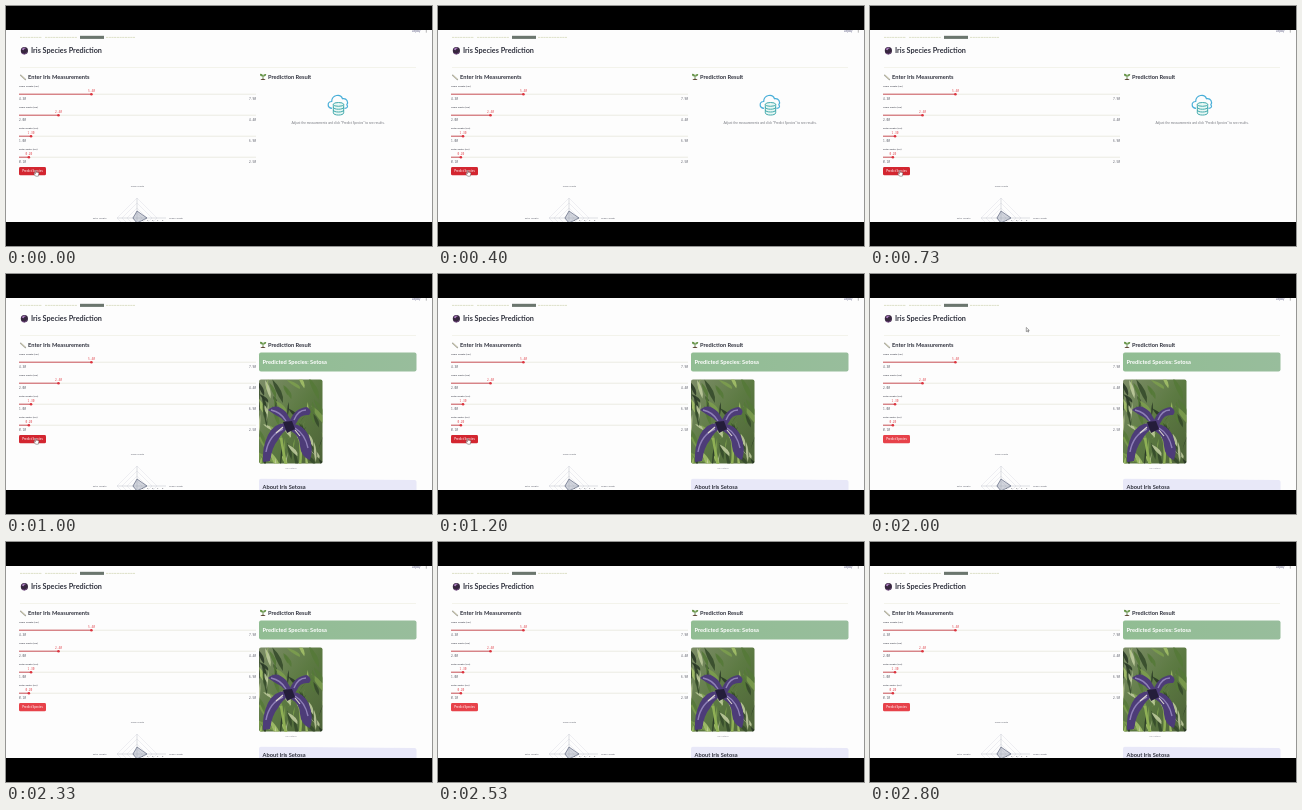
These frames come from a looping animation (426 by 240 pixels, 2.87 s). An HTML page:

```html
<!DOCTYPE html>
<html lang="en">
<head>
<meta charset="utf-8">
<title>Iris Species Prediction</title>
<style>
  html, body { margin: 0; width: 100%; height: 100%; overflow: hidden; background: #000; }
  svg { display: block; width: 100vw; height: 100vh; }
  text { font-family: Lato, "Open Sans", sans-serif; fill: #31333f; }
  .title { font-size: 7.25px; font-weight: 700; }
  .head { font-size: 5.7px; font-weight: 700; }
  .label { font-size: 2.65px; }
  .axis { font-size: 2.5px; fill: #666873; text-anchor: middle; }
  .mono { font-family: "Noto Sans Mono", "DejaVu Sans Mono", monospace; font-size: 2.9px; fill: #555763; }
  .value { fill: #e0454d; }
  .mid { text-anchor: middle; }
  .end { text-anchor: end; }
</style>
</head>
<body>
<svg viewBox="0 0 426 240">
  <defs>
    <clipPath id="page"><rect y="24" width="426" height="192"/></clipPath>
    <clipPath id="frame"><rect x="253" y="105.5" width="63.5" height="84" rx="2"/></clipPath>
    <linearGradient id="banner">
      <stop offset="0" stop-color="#91bd93"/><stop offset="1" stop-color="#98bd9c"/>
    </linearGradient>
    <linearGradient id="foliage" x2="1" y2="1">
      <stop offset="0" stop-color="#7d8d68"/><stop offset=".5" stop-color="#5c7a42"/><stop offset="1" stop-color="#4d6238"/>
    </linearGradient>
  </defs>
  <rect width="426" height="240"/>
  <g clip-path="url(#page)">
    <rect y="24" width="426" height="192" fill="#fdfdfd"/>

    <g id="tabs"></g>
    <text x="406" y="26.1" font-size="2.7" style="fill:#5d5d84">Deploy</text>
    <path d="M420.3 24v2.4" stroke="#666" stroke-width=".8" stroke-dasharray=".6 .4"/>
    <path d="M14 61.5H410" stroke="#ededdf" stroke-width=".6"/>

    <circle cx="18.4" cy="44.7" r="3.6" fill="#37263f"/>
    <path d="M15.6 43.5q2-3 4.3-1.3q-1.8.1-2.2 2z" fill="#a77bbb"/>
    <path d="M16 47.5q3 1.8 5-.8" fill="none" stroke="#784c88" stroke-width=".9"/>
    <text class="title" x="25" y="47.2">Iris Species Prediction</text>

    <path d="M14.7 69.2l4.7 4.3" stroke="#a6a69c" stroke-width="1.5" stroke-linecap="round"/>
    <path d="M15 69.2l4.1 3.8" stroke="#e6dfb5" stroke-width=".5"/>
    <text class="head" x="22" y="73.2">Enter Iris Measurements</text>

    <path d="M257 73v-3.4" stroke="#55833d" stroke-width=".8"/>
    <path d="M257 70.4q-3.3.3-3-2.5q3.2-.3 3 2.5q0-2.8 3.2-2.4q.1 2.8-3.2 2.4" fill="#69964b"/>
    <path d="M254.3 74q2.7-2.6 5.4 0z" fill="#61493a"/>
    <text class="head" x="262" y="73.2">Prediction Result</text>

    <g id="sliders"></g>

    <rect id="button" x="13" y="161" width="27" height="8.3" rx="1.4"/>
    <text class="mid" x="26.5" y="166.1" font-size="3.1" style="fill:#fff">Predict Species</text>

    <g id="radar"></g>

    <g id="waiting">
      <path d="M326 102.3c-5-.4-5.1-6.5-.3-6.8c.2-7 9-8 10.8-2.8c4.4-.8 6.2 3.6 4.3 6.2c1.7 1.6.3 3.5-2.3 3.4"
            fill="none" stroke="#48aed8" stroke-width="1.2"/>
      <g fill="#e8f8f4" stroke="#43aaad" stroke-width="1">
        <path d="M327.3 98.4v8.4c0 3 10.4 3 10.4 0v-8.4z"/>
        <ellipse cx="332.5" cy="98.4" rx="5.2" ry="1.9"/>
        <path d="M327.3 101.2c0 2.7 10.4 2.7 10.4 0M327.3 104c0 2.7 10.4 2.7 10.4 0" fill="none"/>
      </g>
      <text class="mid" x="332" y="118.4" font-size="3.2" style="fill:#777980">Adjust the measurements and click "Predict Species" to see results.</text>
    </g>

    <g id="result">
      <rect x="253" y="78.5" width="157.5" height="19" rx="2" fill="url(#banner)"/>
      <text class="head" x="256.5" y="89.6" style="fill:#fff">Predicted Species: Setosa</text>
      <g id="photo" clip-path="url(#frame)"></g>
      <text class="mid" x="285" y="195" font-size="2.5" style="fill:#92939c">Iris Setosa</text>
      <path d="M253 218V206.8q0-2 2-2L408.5 206q2 0 2 2v10z" fill="#e8e8f8"/>
      <text class="head" x="256.5" y="215">About Iris Setosa</text>
    </g>

    <path id="hand" d="M0-2.4v3.3l-1-.8q-1 .2-.2 1.1l1.5 2h2.7l.6-3q-.1-.9-1-.6q-.4-.7-1-.2q-.4-.5-.8-.1v-1.7q-.4-.7-.8 0z"
          fill="#fff" stroke="#333" stroke-width=".4"/>
    <path id="arrow" d="M0-1.8v4.1l1-.9.7 1.4.7-.3-.7-1.4h1.3z" fill="#fff" stroke="#333" stroke-width=".45"/>
  </g>
</svg>
<script>
const LOOP = 2870, STEP = 200 / 3, PREDICTED = 930;
const DRIFT = 1330, LEAVE = 1600, EXIT = 2130;
const byId = id => document.getElementById(id);
const fill = (id, markup) => { byId(id).innerHTML = markup; };
const progress = (t, from, to) => Math.min(1, Math.max(0, (t - from) / (to - from)));

const tabs = [[14, 22], [39, 32], [100, 29]];
fill("tabs", tabs.map(([x, w]) =>
  `<path d="M${x} 31.4h${w}" stroke="#dde0c8" stroke-width="1" stroke-dasharray="2.2 .5"/>`).join("") +
  `<rect x="74" y="29.8" width="24" height="3.1" fill="#6b766e"/>`);

const sliders = [
  ["Sepal length (cm)", 4.3, 7.9, 5.4],
  ["Sepal width (cm)", 2, 4.4, 2.4],
  ["Petal length (cm)", 1, 6.9, 1.3],
  ["Petal width (cm)", 0.1, 2.5, 0.2]
];
fill("sliders", sliders.map(([label, min, max, value], i) => {
  const y = 88.2 + i * 21, x = 13 + 237 * (value - min) / (max - min);
  return `<text class="label" x="13" y="${y - 6.8}">${label}</text>
    <text class="mono value mid" x="${x}" y="${y - 2.2}">${value.toFixed(2)}</text>
    <path d="M13 ${y}H250" stroke="#e6e6dc" stroke-width=".8"/>
    <path d="M13 ${y}H${x}" stroke="#c9434c" stroke-width=".9"/>
    <circle cx="${x}" cy="${y}" r="1.3" fill="#dc333e"/>
    <text class="mono" x="13" y="${y + 5.9}">${min.toFixed(2)}</text>
    <text class="mono end" x="250" y="${y + 5.9}">${max.toFixed(2)}</text>`;
}).join(""));

const rings = [5, 10, 15, 20].map(r =>
  `<path d="M131 ${212 - r}L${131 + r} 212L131 ${212 + r}L${131 - r} 212z" fill="none" stroke="#dcdce4" stroke-width=".45"/>`).join("");
fill("radar", `${rings}
  <path d="M131 192v24M111 212H160" stroke="#b6b7c1" stroke-width=".45"/>
  <path d="M131 205l10 7-10 5-4-5z" fill="#8f96ab" fill-opacity=".4" stroke="#4c556f" stroke-width=".6"/>
  ${[1, 2, 3, 4, 5].map(n => `<text x="${131 + n * 5}" y="214.8" font-size="2.3">${n}</text>`).join("")}
  <text class="axis" x="131.5" y="180.7">Sepal Width</text>
  <text class="axis" x="93.5" y="213">Petal Length</text>
  <text class="axis" x="170" y="213">Sepal Length</text>`);

function drawPhoto() {
  let seed = 17;
  const random = () => (seed = seed * 16807 % 2147483647) / 2147483647;
  const greens = ["#a6c46a", "#7d9f4e", "#33482a", "#c3cfa2", "#557a38", "#263524"];
  let leaves = "";
  for (let i = 0; i < 90; i++) {
    const x = 248 + random() * 72, y = 100 + random() * 85;
    const dx = (random() - .3) * 20, dy = 8 + random() * 16;
    leaves += `<path d="M${x} ${y}q${dx + 2} ${dy / 2} ${dx} ${dy}q${-dx * .6 - 2} ${-dy / 2} ${-dx} ${-dy}" fill="${greens[i % 6]}" opacity=".85"/>`;
  }
  fill("photo", `<rect x="253" y="105" width="64" height="85" fill="url(#foliage)"/>${leaves}
    <path d="M275 164q2 12 5 27M293 161q3 15 1 30" fill="none" stroke="#8fb055" stroke-width="2.5"/>
    <g fill="#4d3c78">
      <path d="M262 136q8-8 18 2l7 12q-7 0-12-6q-6-3-13-8z"/>
      <path d="M280 149q-12 0-18 12q-6 12-5 27l7-1q2-14 8-21q4-8 11-12z"/>
      <path d="M283 149q5-15 18-16q6 4 2 8q-9-1-12 7l-4 6z"/>
      <path d="M286 150q11 0 17 12q5 13 1 24q-9-3-10-14q0-10-9-15z"/>
    </g>
    <g fill="none" stroke="#8f80b8" stroke-width="1.4">
      <path d="M265 136q10 2 15 11M260 178q3-17 17-23M288 146q4-10 12-10M289 154q10 6 13 20"/>
    </g>
    <path d="M277 148l9-1 3 8-8 4z" fill="#241d3a"/>
    <path d="M277 153l-7 6M289 156l5 6" stroke="#ddd8cf" stroke-width="1.1"/>`);
}

const show = (id, visible) => byId(id).setAttribute("visibility", visible ? "visible" : "hidden");
const place = (id, x, y) => byId(id).setAttribute("transform", `translate(${x} ${y})`);

function draw(time) {
  const t = Math.floor(time / STEP + .01) * STEP;
  const predicted = t >= PREDICTED;
  show("waiting", !predicted);
  show("result", predicted);

  // The pointer rests on the button, then sweeps out through the top edge.
  const drift = progress(t, DRIFT, LEAVE), sweep = progress(t, LEAVE, EXIT);
  const x = 29.3 + 1.7 * drift + 166 * sweep;
  const y = 167 - 1.5 * drift - 146 * sweep;
  const hovering = y > 161;
  byId("button").setAttribute("fill", hovering ? "#d32630" : "#e7424a");
  show("hand", hovering);
  show("arrow", !hovering && sweep < 1);
  place("hand", x, y);
  place("arrow", x, y);
}

function tick(now) {
  draw(now % LOOP);
  requestAnimationFrame(tick);
}

drawPhoto();
draw(0);
requestAnimationFrame(tick);
</script>
</body>
</html>
```
